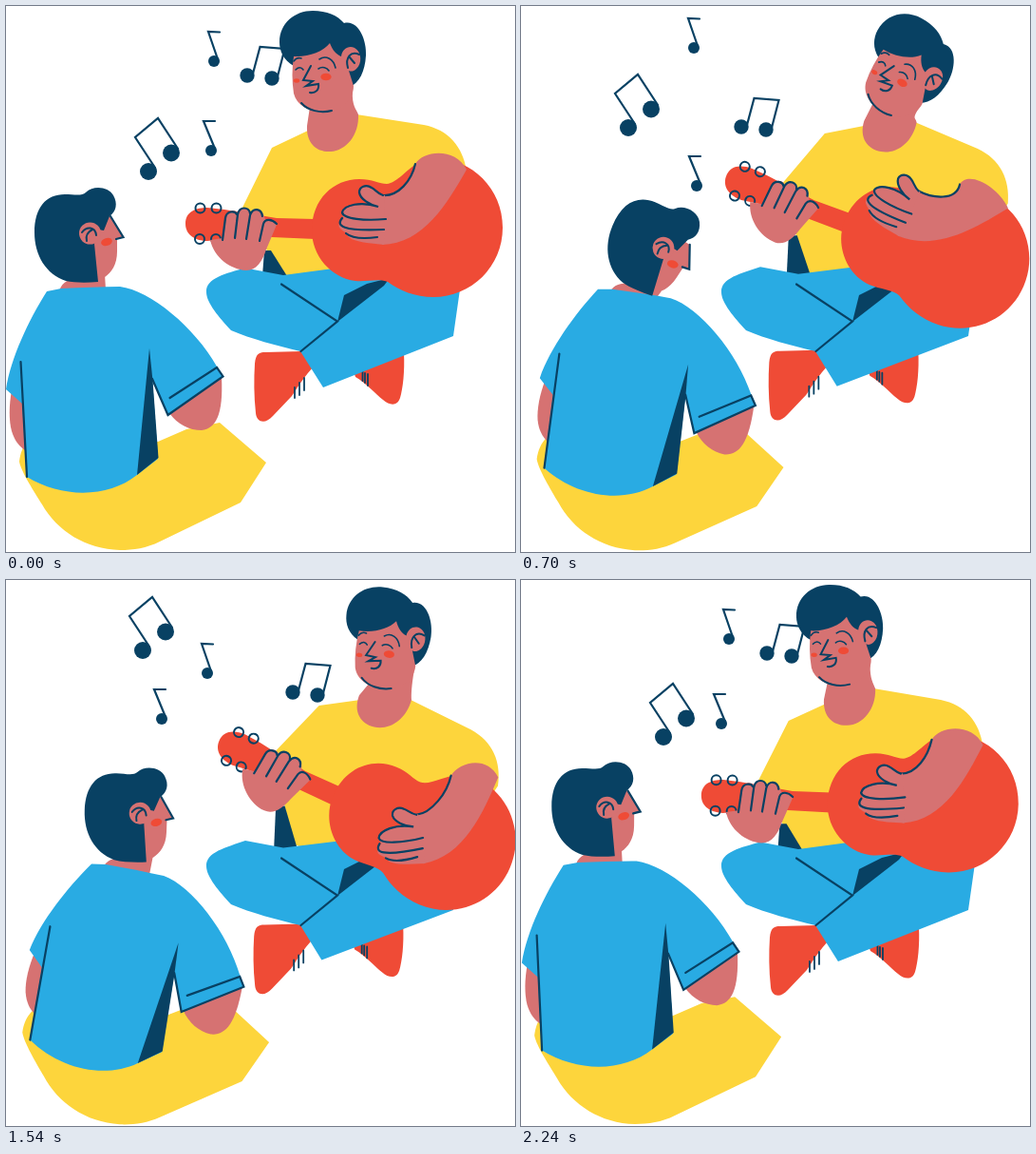
An HTML page with a canvas for the animation above (2.31 s loop, 536 px wide and 574 px high).

```html
<!DOCTYPE html>
<html lang="en">
<head>
<meta charset="utf-8">
<title>Guitar session</title>
<style>
html, body { margin: 0; width: 100%; height: 100%; overflow: hidden; background: #fff; }
canvas { display: block; width: 536px; height: 574px; }
</style>
</head>
<body>
<canvas id="stage" width="536" height="574"></canvas>
<script>
const g = document.getElementById('stage').getContext('2d');
const NAVY = '#084163', YELLOW = '#fdd53c', BLUE = '#29abe3', SKIN = '#d67272', RED = '#ef4b36';
const STEP = 70, COUNT = 33;

// Smooth periodic curve through key values without overshoot
function track(times, vals) {
  const n = times.length;
  const time = i => times[(i + n) % n] + COUNT * Math.floor(i / n);
  const val = i => vals[(i + n) % n];
  const slope = i => (val(i + 1) - val(i)) / (time(i + 1) - time(i));
  const tangent = i => {
    const a = slope(i - 1), b = slope(i);
    return a * b <= 0 ? 0 : 2 * a * b / (a + b);
  };
  return k => {
    let i = n - 1;
    while (times[i] > k) i--;
    const h = time(i + 1) - time(i), s = (k - time(i)) / h, r = 1 - s;
    return val(i) * r * r * (1 + 2 * s) + val(i + 1) * s * s * (3 - 2 * s)
      + h * s * r * (tangent(i) * r - tangent(i + 1) * s);
  };
}
const KEYS = [0, 6, 10, 14, 22, 28, 32];
const key = (...vals) => track(KEYS, vals);

const sway = track([0, 2, 6, 10, 14, 17, 20, 22, 24, 28, 32],
  [0, .03, .34, .655, .925, 1, .925, .81, .655, .34, .03]);

// Offsets and turns relative to each torso
const head = { x: key(0, 7, 8, 7, -3, -2, 0), y: key(0, 2, 5, 5, 0, 0, 0), a: key(0, 8.7, 14, 8, -11.5, -11.3, -1.6) };
const hand = { x: key(0, -7, -5, -2, 19, 21, 4), y: key(0, -17, -26, -1, 54, 36, 7), a: key(0, 8.7, 9.9, 2, -26.5, -17.3, -3.6) };
const friend = { x: key(0, 10, 13, 8, -7, -4, 0), y: key(0, 4, 8, 5, -4, -3, 0), a: key(0, 9.5, 12, 0, -11, -4, 0) };
const faceTurn = key(0, 8, 10, 14, 0, 2, 0);
const armTop = key(0, 0, 0, 4, 12, 6, 1), cuff = key(0, 6, 6, 8, -8, -6, 0);

const notes = [
  { x: key(219, 198, 182, 188, 212, 218, 219), y: key(58, 48, 44, 63, 98, 76, 62),
    heads: [[0, 0]], r: 6, stem: 'M4,-2 L-6,-31 L6,-30.5' },
  { x: key(216, 199, 185, 173, 164, 192, 211), y: key(152, 177, 189, 178, 146, 147, 151),
    heads: [[0, 0]], r: 6, stem: 'M4,-2 L-8,-31 L4,-31' },
  { x: key(254, 238, 232, 255, 302, 278, 259), y: key(73, 104, 127, 131, 118, 92, 77),
    heads: [[0, 0], [26, 3]], r: 7.7, stem: 'M6,-2 L13.5,-30 L39.5,-28 L32,1' },
  { x: key(150, 125, 113, 118, 144, 149, 150), y: key(174, 148, 128, 107, 74, 128, 165),
    heads: [[0, 0], [24, -19.5]], r: 9, stem: 'M7,-4 L-14,-36 L10,-56 L31,-24' }
];

// Moves point p onto q and turns around it
const pose = (px, py, qx, qy, deg) =>
  new DOMMatrix().translate(qx, qy).rotate(deg).translate(-px, -py);
const spin = (x, y, deg) => pose(x, y, x, y, deg);
const at = (m, x, y) => { const p = m.transformPoint({ x, y }); return [p.x, p.y]; };
const add = (p, x, y) => [p[0] + x, p[1] + y];
const mix = (p, q, s) => [p[0] + (q[0] - p[0]) * s, p[1] + (q[1] - p[1]) * s];
const attach = (m, x, y, part, k, deg) => {
  const q = at(m, x, y);
  return pose(x, y, q[0] + part.x(k), q[1] + part.y(k), deg + part.a(k));
};

const use = m => g.setTransform(m);
const reset = () => g.setTransform(1, 0, 0, 1, 0, 0);
function fill(color, d) {
  g.fillStyle = color;
  g.fill(new Path2D(d));
}
function line(d, width = 2.2) {
  g.strokeStyle = NAVY;
  g.lineWidth = width;
  g.stroke(new Path2D(d));
}
function dot(color, x, y, rx, ry = rx, tilt = 0) {
  g.fillStyle = color;
  g.beginPath();
  g.ellipse(x, y, rx, ry, tilt, 0, 7);
  g.fill();
}

function drawNote(n, k) {
  g.setTransform(1, 0, 0, 1, n.x(k), n.y(k));
  n.heads.forEach(([x, y]) => dot(NAVY, x, y, n.r));
  line(n.stem);
}

function drawLegs(u) {
  g.setTransform(1, 0, 0, 1, -u, -2 * u);
  fill(RED, 'M262,376 C263,366 266,364 273,364 L312,363 L330,374 C318,383 309,398 301,410 L281,431 C273,440 264,438 263,428 C261,410 261,392 262,376Z');
  fill(RED, 'M366,384 L419,365 C420,384 418,402 415,412 C412,421 404,420 397,414 C389,408 379,396 368,390Z');
  line('M304,401V412 M309,396V409 M314,391V404 M375.5,384V394 M378,386V396 M381,387V399', 1.8);
  reset();
  fill(BLUE, `M211,301 C210,286 232,281 252,${275.5 - 2 * u} L292,${283 - 2 * u} L352,${275 - u} L410,268 L478,298 L471,347 L${334 - 2 * u},${401 - 2 * u} L310,363 C285,357 258,350 237,341 C225,328 211,312 211,301Z`);
  fill(NAVY, 'M356,304 L380,292 L404,286 L398,294 L349,332Z');
  line('M290,292.5 L349,331.5 L310.5,363');
}

function drawPlayerHead(m) {
  use(m);
  fill(NAVY, 'M303,63 C292,57 288,47 288,38 C288,18 304,5 323,5 C338,5 349,10 356,18 C371,14 380,36 379,52 C378,69 372,81 362,85 L340,60Z');
  fill(SKIN, 'M303,53 C318,54 334,48 341,39 C344,47 348,51 353,53 C354,45 361,41 367,44 C375,48 375,61 369,66 C366,69 363,69 361,68 L366,84 C366,92 362,99 358,102 C352,109 343,112 333,111 C318,111 306,104 303,92 C301,79 301,66 303,53Z');
  dot(RED, 337, 74.5, 5.6, 3.8);
  dot(RED, 306, 78.5, 3.2, 2.2);
  line('M311,102 C318,110 331,113 343,110', 2);
  line('M372,51 C363,47 357,54 360,65 M361,53 L367,60', 2);
  line('M303,58 C305,55 308,54 311,55 M330,56 C337,51 345,56 347,65 M305,67 C308,64 311,64 313,67 M329,66 C333,63 338,65 340,68', 1.6);
  line('M321,63 L313,78 L323,79 L316,84 L329,82 C330,88 326,92 320,91', 2);
}

function drawGuitar(m) {
  use(m);
  fill(RED, 'M189,229 C189,216 200,212 212,212 L230,214 L285,223 L326,224 L326,245 L280,243 L230,245 L212,247 C200,247 189,241 189,229Z');
  fill(RED, 'M322,236 C322,203 345,182 372,182 C386,182 393,187 401,187 C412,186 421,172 438,162 C482,153 523,187 523,233 C523,274 490,306 450,306 C431,306 414,299 402,290 C394,286 380,290 368,289 C342,286 322,262 322,236Z');
  [[204.5, 212.5], [221.5, 212.5], [204, 245], [221, 245]].forEach(([x, y]) =>
    line(`M${x - 5},${y} a5,5 0 1 1 10,0 a5,5 0 1 1 -10,0`, 2));
}

function drawFretHand(m, u) {
  use(m.translate(10 * u, 0));
  fill(SKIN, 'M215,246 C219,264 236,277 253,278 C264,278 270,268 274,256 L285,230 C282,226 278,224 273,224 L271,219 C268,212 261,212 258,217 C255,211 247,211 244,217 C240,213 232,215 231,222 L228,244Z');
  line('M228,246 L231,223 C232,215 241,215 243,219 M241,244 L244,219 C246,210 256,211 257,218 M253,245 L257,220 C260,211 269,213 270,221 M267,247 L271,229 C273,223 280,224 285,229');
}

function drawStrumArm(body, m, k) {
  const p = add(at(body, 431, 166), 0, armTop(k));
  const s = add(at(body, 485, 172), 0, cuff(k));
  const low = at(m, 396, 251), bend = at(m, 440, 250), thumb = at(m, 397, 199);
  const wrist = at(m, 413, 200), inner = add(p, -4, 18);
  reset();
  fill(SKIN, `M${p} C${add(p, 9, -15)} ${add(s, -11, -23)} ${s} C${mix(s, bend, .45)} ${bend} ${low} L${thumb} C${wrist} ${inner} ${p}Z`);
  line(`M${p} C${inner} ${wrist} ${thumb}`);
  use(m);
  fill(SKIN, 'M399,199 C392,197 390,194 386,191 C380,187 372,190 372,196 C373,202 380,207 388,210 C372,206 356,210 354,217 C354,220 355,222 356,223 C351,226 349,231 352,234 C355,237 358,238 359,239 C359,244 367,247 380,249 L398,251Z');
  line('M397,199 C391,197 389,193 385,191 C379,187 372,190 372,196 C373,203 383,209 392,211 C374,205 356,209 354,217 C355,224 378,226 400,224 M354,223 C347,231 354,237 398,235 M358,239 C364,244 376,245 391,243');
}

function drawPlayer(u, k) {
  const deg = 21.6 * u, body = spin(360, 302, deg);
  const top = attach(body, 337, 75, head, k, deg);
  const guitar = pose(354, 282, 354 + 2.5 * u, 282, 28.1 * u);
  const palm = attach(body, 351, 231, hand, k, deg);
  use(body);
  fill(YELLOW, 'M280,149 L318,131 L369,114 L440,125 C466,130 481,148 485,173 L480,190 L450,210 L460,300 L298,296 L291,283 L275,257 L244,222Z');
  reset();
  fill(NAVY, `M${272 + 15 * u},${257 - 24 * u} L${279 + 18 * u},${257 - 24 * u} L${296 + 13 * u},${284 - 3 * u} L${270 + 15 * u},${284 - 2 * u}Z`);
  fill(SKIN, `M${at(body, 317, 126)} C${at(body, 316, 145)} ${at(body, 328, 154)} ${at(body, 342, 153)} C${at(body, 358, 152)} ${at(body, 372, 136)} ${at(body, 371, 114)} C${at(body, 369, 109)} ${at(top, 364, 104)} ${at(top, 365, 90)} L${at(top, 330, 90)} L${at(top, 320, 106)}Z`);
  drawPlayerHead(top);
  drawLegs(u);
  drawGuitar(guitar);
  drawFretHand(guitar, u);
  drawStrumArm(body, palm, k);
}

// The face turns a little further than the hair
function drawFriendHead(m, turn) {
  use(m.multiply(spin(88, 239, turn)));
  fill(SKIN, 'M92,221 L110,221 L123,243 L117,245 L117,258 C117,272 111,280 104,285 L92,287Z');
  dot(RED, 106, 248, 6, 4, -.3);
  line('M110,221 L123.5,243 L116,245');
  use(m);
  fill(NAVY, 'M30,238 C30,212 42,198 62,198 C72,198 80,200 84,196 C92,188 108,190 113,199 C118,208 116,216 109,221 L103,236 L97,235 L93,250 L97,290 C85,291 72,291 63,289 C42,282 30,262 30,238Z');
  dot(SKIN, 88.5, 239, 11.5);
  line('M80,238 C85,231 94,232 95,241 M91,235 C85,238 84,243 85,247', 2);
}

function drawFriend(u, k) {
  const deg = 16.2 * u, body = spin(73.5, 503.7, deg);
  const top = attach(body, 88, 239, friend, k, deg);
  use(pose(110, 500, 110 + 3 * u, 500, 2.6 * u));
  fill(YELLOW, 'M14,479 C15,470 18,462 24,456 L100,470 L160,458 L190,445 L225,438 L274,480 L247,522 L162,563 C148,570 134,572 120,572 C84,571 54,552 38,524 C30,511 16,490 14,479Z');
  use(body);
  fill(SKIN, 'M6,404 C3,420 3,436 6,447 C9,457 14,463 20,467 L22,410Z');
  fill(SKIN, 'M172,428 C181,440 193,446 206,446 C221,444 229,430 227,390Z');
  reset();
  fill(SKIN, `M${at(body, 56, 301)} C${at(body, 57, 292)} ${at(top, 65, 286)} ${at(top, 76, 287)} L${at(top, 97, 272)} L${at(top, 104, 282)} L${at(body, 105, 298)}Z`);
  use(body);
  fill(BLUE, 'M43,300 L58,297 C80,296 100,295 120,295 C152,299 199,338 222,379 L229,389 L170,430 L154,392 L160,476 L138,493 C108,517 60,518 22,495 L17,418 L0,403 C5,370 24,330 43,300Z');
  fill(NAVY, 'M151,360 L154.5,394 L160.5,475 L138,493Z');
  line('M15.5,374 L22,495');
  line('M154,392 L170.5,430 L228.5,389.5 L222,380 L172.5,412');
  drawFriendHead(top, faceTurn(k));
}

function draw(now) {
  const k = Math.floor(now / STEP) % COUNT, u = sway(k);
  reset();
  g.fillStyle = '#fff';
  g.fillRect(0, 0, 536, 574);
  g.lineCap = 'round';
  notes.forEach(n => drawNote(n, k));
  drawPlayer(u, k);
  drawFriend(u, k);
}

const start = performance.now();
function loop() {
  draw(performance.now() - start);
  requestAnimationFrame(loop);
}
loop();
</script>
</body>
</html>
```
